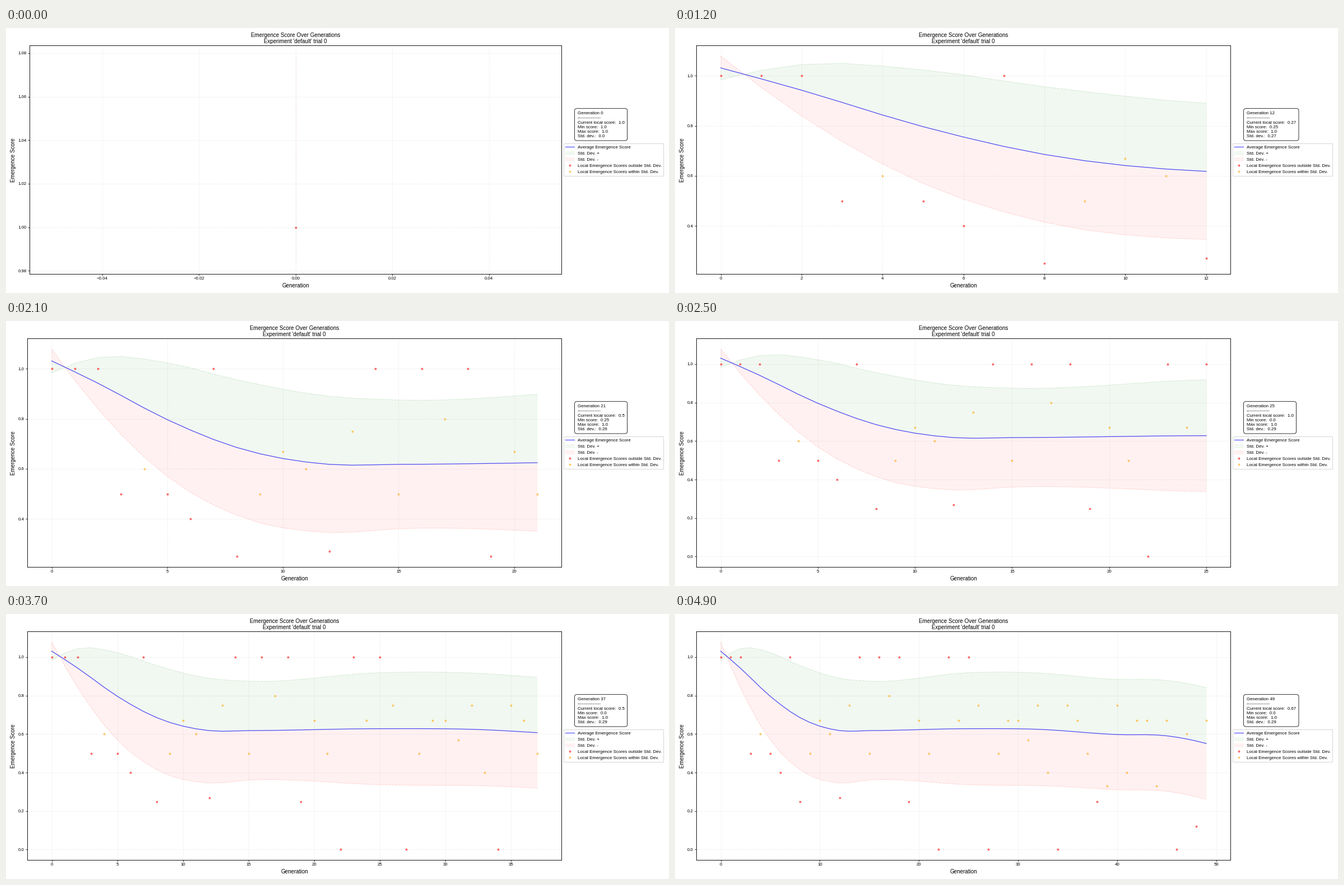
Recreate the animation shown at these times as a matplotlib script. Size 1183x473 px, loop 5 s.

```python
import numpy as np
import matplotlib.pyplot as plt
from matplotlib.animation import FuncAnimation
from matplotlib.colors import to_rgba
from matplotlib.lines import Line2D
from matplotlib.patches import FancyBboxPatch, Patch

W, H = 1183, 473
TOP, BOTTOM, RIGHT = 31.4, 438.9, 991.2
BIG, SMALL = 9.86, 7.89

plt.rcParams.update({
    "font.family": "Liberation Sans",
    "font.size": SMALL,
    "axes.linewidth": 0.9,
    "xtick.labelsize": SMALL, "ytick.labelsize": SMALL,
    "xtick.major.size": 3, "ytick.major.size": 3,
    "xtick.major.pad": 2.5, "ytick.major.pad": 2.5,
    "xtick.major.width": 0.8, "ytick.major.width": 0.8,
})

# the measured score of each generation
SCORES = np.array([
    1, 1, 1, .5, .6, .5, .4, 1, .25, .5, .67, .6, .27, .75, 1, .5, 1,
    .8, 1, .25, .67, .5, 0, 1, .67, 1, .75, 0, .5, .67, .67, .57, .75, .4,
    0, .75, .67, .5, .25, .33, .75, .4, .67, .67, .33, .67, 0, .6, .12, .67])
GENS = np.arange(len(SCORES))
OUTSIDE = (SCORES > .9) | (SCORES < .3) | (SCORES <= .5) & (GENS < 8)


def smooth(xs, ys):
    """Hermite curve through a few key points, taken at every generation."""
    xs, ys = np.array(xs), np.array(ys)
    slope = np.gradient(ys, xs, edge_order=2)
    i = np.clip(np.searchsorted(xs, GENS, side="right") - 1, 0, len(xs) - 2)
    h = xs[i + 1] - xs[i]
    t = (GENS - xs[i]) / h
    return ((1 + 2 * t) * (1 - t) ** 2 * ys[i] + t * (1 - t) ** 2 * h * slope[i]
            + t * t * (3 - 2 * t) * ys[i + 1] + t * t * (t - 1) * h * slope[i + 1])


AVG = smooth([0, 2, 5, 8, 12, 15, 25, 32, 40, 45, 49],
             [1.031, .942, .7965, .6855, .618, .618, .628, .6248, .5975, .591, .551])
DEV = smooth([0, 2, 5, 8, 12, 15, 25, 40, 49],
             [-.0477, .1025, .2265, .2705, .272, .257, .291, .2868, .2905])
UPPER, LOWER = AVG + DEV, AVG - DEV

LINE = dict(color="blue", alpha=.65, lw=1.3)


def band_style(color):
    return dict(facecolor=to_rgba(color, .055), edgecolor=to_rgba(color, .06),
                linestyle="--", linewidth=.8)


def dot_style(color):
    return dict(color=color, alpha=.48, marker="o", ls="none", ms=3, mew=1)


fig = plt.figure(figsize=(W / 72, H / 72), dpi=72, facecolor="white")
ax = fig.add_axes([0, 0, 1, 1])


def label(x, y, text="", size=BIG, **kw):
    """Text with its baseline at a pixel position, measured from the top."""
    return fig.text(x / W, 1 - y / H, text, fontsize=size, va="baseline", **kw)


centred = [
    label(0, 16.2, "Emergence Score Over Generations", ha="center"),
    label(0, 26.9, "Experiment 'default' trial 0", ha="center"),
    label(0, 462.9, "Generation", ha="center"),
]
label(15.6, (TOP + BOTTOM) / 2, "Emergence Score", ha="center",
      rotation=90, rotation_mode="anchor")

box = FancyBboxPatch((1018.6, H - 197), 86, 49.3, boxstyle="round,pad=4,rounding_size=4",
                     transform=None, fc="white", ec="black", lw=.8)
fig.add_artist(box)
info = [label(1019.5, 154.3 + 8.15 * i, size=SMALL, zorder=5) for i in range(6)]

fig.legend(
    handles=[
        Line2D([], [], label="Average Emergence Score", **LINE),
        Patch(label="Std. Dev. +", **band_style("green")),
        Patch(label="Std. Dev. -", **band_style("red")),
        Line2D([], [], label="Local Emergence Scores outside Std. Dev.", **dot_style("red")),
        Line2D([], [], label="Local Emergence Scores within Std. Dev.", **dot_style("orange")),
    ],
    loc="upper left", bbox_to_anchor=(995 / W, 1 - 206 / H), labelspacing=.455,
    borderaxespad=0, fontsize=SMALL, edgecolor="0.8")


def padded(lo, hi):
    pad = .05 * (hi - lo)
    return lo - pad, hi + pad


def draw(gen):
    n = gen + 1
    x, seen, out = GENS[:n], SCORES[:n], OUTSIDE[:n]
    # two-decimal tick labels push the axes to the right
    left = 42.3 if gen < 3 else 38.2

    ax.clear()
    ax.set_position([left / W, 1 - BOTTOM / H, (RIGHT - left) / W, (BOTTOM - TOP) / H])
    ax.grid(True, ls="--", lw=.6, color="#b0b0b0", alpha=.3)
    ax.set_axisbelow(True)
    for edge, color in ((UPPER, "green"), (LOWER, "red")):
        ax.fill_between(x, AVG[:n], edge[:n], **band_style(color))
        ax.plot(x, edge[:n], "--", color=color, alpha=.11, lw=1.1)
    ax.plot(x, AVG[:n], **LINE)
    ax.plot(x[out], seen[out], **dot_style("red"))
    ax.plot(x[~out], seen[~out], **dot_style("orange"))
    values = np.concatenate([seen, UPPER[:n], LOWER[:n]])
    ax.set_xlim(padded(0, gen) if gen else (-.055, .055))
    ax.set_ylim(padded(values.min(), values.max()))

    for text in centred:
        text.set_x((left + RIGHT) / 2 / W)

    current, low, high, dev = (
        str(round(float(v), 2)) for v in (seen[-1], seen.min(), seen.max(), seen.std()))
    lines = [f"Generation {gen}", "-" * 16, f"Current local score:  {current}",
             f"Min score:  {low}", f"Max score:  {high}", f"Std. dev.:  {dev}"]
    for text, line in zip(info, lines):
        text.set_text(line)
    box.set_width(86 + 4.4 * (len(current) - 3))


anim = FuncAnimation(fig, draw, frames=len(GENS), init_func=lambda: draw(0),
                     interval=100, repeat=True, repeat_delay=0)
plt.show()
```
